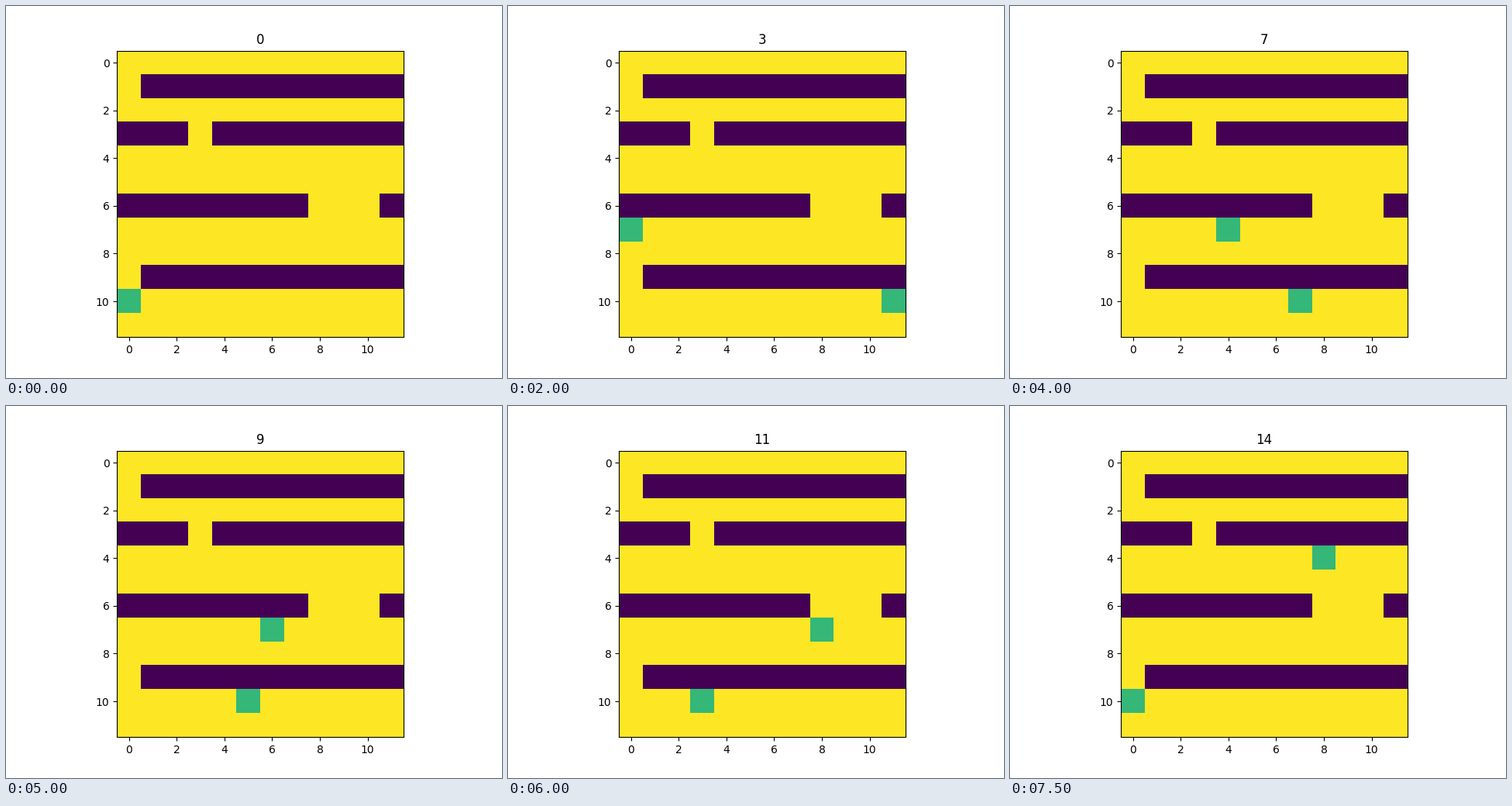
Animation of 640 by 480 pixels, one loop 8 s. Source, as a matplotlib script:

```python
import matplotlib.pyplot as plt
import numpy as np
from matplotlib.animation import FuncAnimation

SIZE = 12
WALL, AGENT, FREE = 0, 2, 3
SPAWN_EVERY = 3
STEP_MS = 500
STEPS = 15

# Wall row -> open columns
GAPS = {1: [0], 3: [3], 6: [8, 9, 10], 9: [0]}


def build_maze():
    maze = np.full((SIZE, SIZE), FREE)
    for row, gaps in GAPS.items():
        maze[row] = WALL
        maze[row, gaps] = FREE
    return maze


def first_agent(step):
    """Up through the left gap, right to column 8, then up again."""
    up = min(step, 3)
    right = min(max(step - 3, 0), 8)
    return 10 - up - max(step - 11, 0), right


def second_agent(step):
    """Enters at the right edge and walks left."""
    return 10, SIZE - 1 - (step - SPAWN_EVERY)


def grid_at(step):
    grid = maze.copy()
    grid[first_agent(step)] = AGENT
    if step >= SPAWN_EVERY:
        grid[second_agent(step)] = AGENT
    return grid


maze = build_maze()
fig, ax = plt.subplots(figsize=(6.4, 4.8), dpi=100)
image = ax.imshow(grid_at(0), cmap="viridis", vmin=WALL, vmax=FREE)
title = ax.set_title("0")


def update(frame):
    step = max(frame - 1, 0)  # the opening pose is held for two ticks
    image.set_data(grid_at(step))
    title.set_text(str(step))
    return image, title


anim = FuncAnimation(fig, update, frames=STEPS + 1, interval=STEP_MS,
                     repeat=True, repeat_delay=0, blit=False)
plt.show()
```
